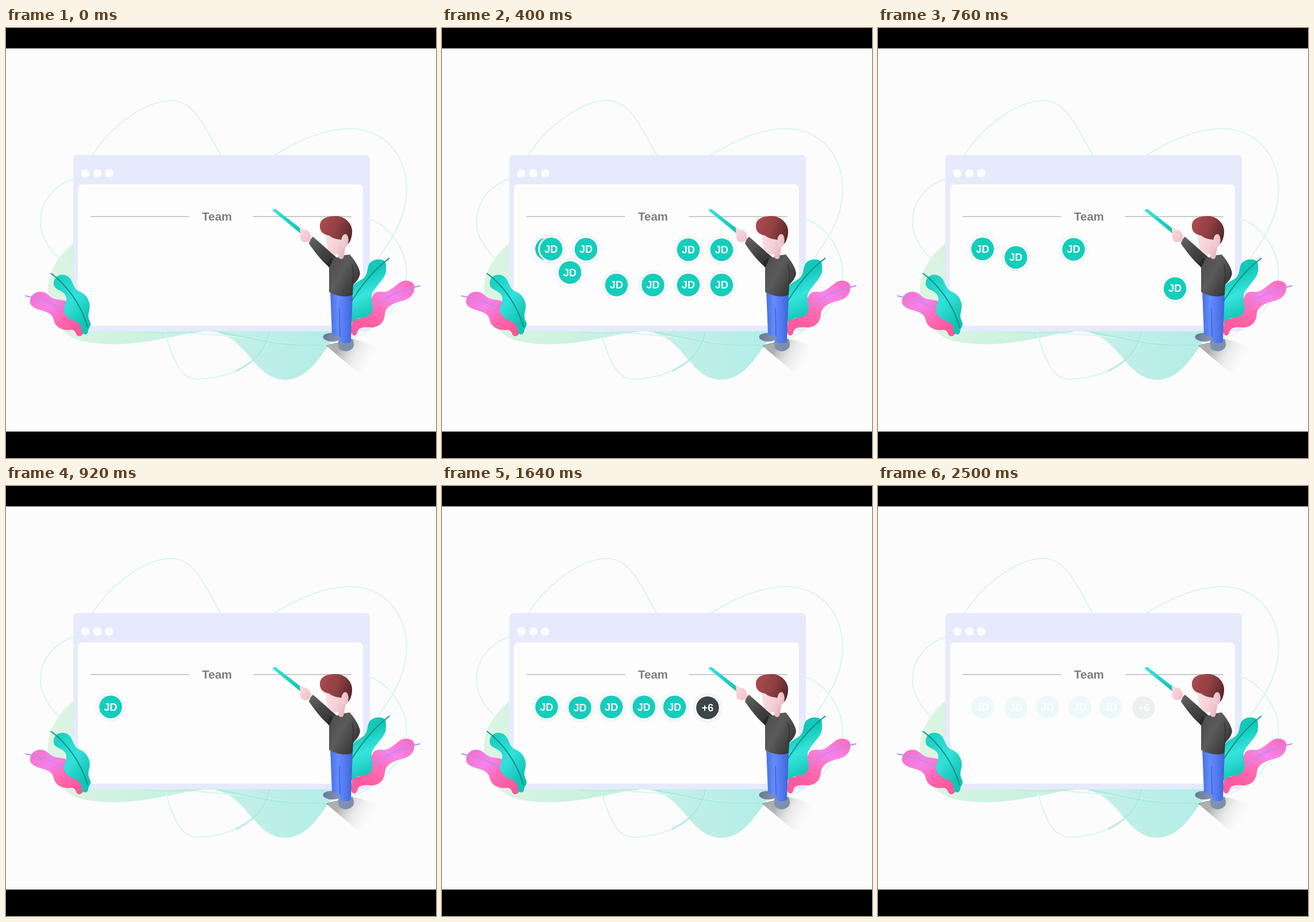
An HTML page with a canvas for the animation above (2740 ms loop, 748 by 748 pixels).

```html
<!DOCTYPE html>
<html lang="en">
<head>
<meta charset="utf-8">
<title>Team</title>
<style>
  html, body { margin: 0; width: 100%; height: 100%; overflow: hidden; background: #fcfcfc; }
  canvas { position: absolute; left: 0; top: 0; width: 748px; height: 748px; }
</style>
</head>
<body>
<canvas id="scene"></canvas>
<canvas id="avatars"></canvas>
<script>
const SIZE = 748, LOOP = 2740, TICK = 20;
const FONT = '"Liberation Sans", Arial, sans-serif';

function layer(id) {
  const canvas = document.getElementById(id);
  const dpr = window.devicePixelRatio || 1;
  canvas.width = canvas.height = Math.round(SIZE * dpr);
  const ctx = canvas.getContext('2d');
  ctx.scale(dpr, dpr);
  return ctx;
}
const bg = layer('scene'), fg = layer('avatars');

// ---- Static illustration ----
function grad(x0, y0, x1, y1, ...colors) {
  const g = bg.createLinearGradient(x0, y0, x1, y1);
  colors.forEach((c, i) => g.addColorStop(i / (colors.length - 1), c));
  return g;
}
function fill(d, style) {
  bg.fillStyle = style;
  bg.fill(new Path2D(d));
}
function line(d, style, width) {
  bg.strokeStyle = style;
  bg.lineWidth = width;
  bg.stroke(new Path2D(d));
}
function box(x, y, w, h, r, style) {
  bg.fillStyle = style;
  bg.beginPath();
  bg.roundRect(x, y, w, h, r);
  bg.fill();
}
function oval(x, y, rx, ry, turn, style) {
  bg.fillStyle = style;
  bg.beginPath();
  bg.ellipse(x, y, rx, ry, turn, 0, Math.PI * 2);
  bg.fill();
}

function drawBackdrop() {
  box(0, 0, SIZE, SIZE, 0, '#fcfcfc');
  fill('M125 368C98 388 73 418 73 455C74 500 95 534 130 544C205 562 285 536 338 528C420 520 424 612 487 612C530 610 548 566 580 527L580 400Z',
    grad(80, 0, 560, 0, '#dcf4e2', '#cbf2df', '#c2f0e7', '#b3ede8'));
  const mint = '#d6f7ef';
  line('M150 222C183 168 245 126 288 126C330 126 350 182 374 222', mint, 2);
  line('M466 222C520 188 565 174 603 175C660 178 697 222 697 282C696 335 668 372 633 420', mint, 2);
  line('M632 332C668 345 696 385 697 425C695 480 640 545 545 553C480 555 420 530 240 528', mint, 2);
  line('M118 262C85 273 60 300 60 338C60 370 90 405 118 419', mint, 2);
  line('M275 527C290 570 300 612 335 611C400 608 452 575 460 527', mint, 2);
  line('M370 529C430 540 480 555 555 552M400 597C435 580 454 556 459 527', '#a5e8dd', 2);
  line('M240 528C265 532 310 530 340 528', '#b5ecdc', 2);
}

function drawWindow() {
  box(117, 221, 516, 306.5, 8, '#e6eafc');
  box(125, 272, 496, 246, 8, '#fdfdfd');
  for (const x of [138, 159, 179.5]) oval(x, 253, 7.3, 7.3, 0, '#fdfdfd');
  line('M147 328H318.5M429.5 328H601', '#bababa', 1.4);
  bg.fillStyle = '#7d7d7d';
  bg.font = `bold 20.5px ${FONT}`;
  bg.textAlign = 'center';
  bg.fillText('Team', 367, 334.5);
}

function drawLeaves() {
  bg.lineCap = 'round';
  fill('M42 473C45 458 62 455 72 463C84 475 92 471 104 475C115 490 125 505 131 515C138 525 136 537 126 536C120 534 124 528 115 525C100 527 86 522 83 508C80 493 66 494 52 488C44 484 41 480 42 473Z',
    grad(55, 460, 120, 530, '#f873cd', '#f581ea', '#ff67b0', '#fb5799'));
  line('M34 466C62 471 84 479 104 491', '#b98af2', 1.8);
  fill('M83 445C82 432 95 426 106 431C118 438 115 452 127 458C143 464 149 480 144 495C141 508 149 510 147 518C145 522 143 523 143 528C141 536 133 534 131 526C132 515 124 512 115 508C100 500 98 490 104 478C108 464 100 460 92 456C86 453 83 450 83 445Z',
    grad(85, 450, 145, 500, '#1ed0c4', '#33e1da', '#13c3b4'));
  line('M78.500 427C106 447 131 482 142 520', '#079585', 2);

  fill('M710 455C714 440 697 437 688 441C676 448 668 460 655 459C640 458 636 462 634 485C632 500 612 510 603 505L600 528C602 537 609 537 611 530C613 520 622 520 635 521C652 520 658 510 659 498C661 483 675 478 692 474C704 470 709 463 710 455Z',
    grad(690, 440, 635, 520, '#fb70c4', '#f684ec', '#ff6eb5', '#fc5c9f'));
  line('M720 448.500C690 455 660 466 637 488', '#b98af2', 1.8);
  fill('M661 414C662 402 650 401 640 404C630 408 630 415 628 425C624 440 612 437 600 452L600 514C609 501 625 507 634 498C642 488 633 470 637 462C642 450 655 440 660 428Q662 420 661 414Z',
    grad(620, 430, 645, 490, '#14c7b9', '#37e4dd', '#19cabd'));
  line('M666.500 400.500C642 419 620 445 602 474', '#079585', 2);
}

function drawPresenter() {
  fill('M556 552L612 599Q640 588 653 561Q630 545 603 541Z',
    grad(582, 552, 636, 580, 'rgba(70,70,70,.42)', 'rgba(150,150,150,.16)', 'rgba(200,200,200,0)'));

  const shoe = grad(552, 530, 606, 562, '#6b7790', '#8195b2', '#788ca8');
  oval(567, 538, 15.5, 7.5, .05, shoe);
  fill('M579 541L603 541Q607 552 603 557Q594 566 582 560Q575 554 579 541Z', shoe);

  const blue = grad(564, 0, 604, 0, '#466fe0', '#638bfb', '#527af0', '#3b62cd');
  fill('M564 456L603 463L600 546Q591 551 581 546L580 535Q573 538 567 531Z', blue);
  line('M580 488L581 536', '#3e65d2', 1.5);

  fill('M463 317L468.500 314.500L518 353L513 358Z', grad(465, 316, 514, 356, '#36e5e0', '#12bfb1'));
  fill('M511 349Q513 345 517 350Q527 351 529 358Q533 363 528 370Q521 375 514 370Q511 367 512 359Z',
    grad(512, 355, 530, 370, '#f9d8dc', '#efbfc8'));

  const cloth = grad(562, 400, 617, 430, '#4c4c4c', '#5b5b5b', '#393939');
  fill('M527 375Q529 367 534 363L568 393L578 402L564 417Q549 407 527 375Z',
    grad(530, 366, 568, 412, '#636363', '#454545', '#303030'));
  fill('M565 398Q574 402 583 396L598 394C605 402 615 416 616 427C614 438 607 443 604 447L603 464C594 470 573 466 562 459L562 419Z', cloth);
  fill('M562 417Q567 409 569 401L566 399L558 411Z', '#292929');
  line('M602 412Q607 430 602 446', '#333333', 1.5);

  const skin = grad(556, 370, 598, 385, '#fadde0', '#f4cfd5', '#e4adb9');
  fill('M556 354L590 354L590 384L587 400Q583 404 579 400L577 393C563 397 556 383 556 354Z', skin);
  fill('M546 345C546 330 560 327 575 327C592 328 604 343 602 357C601 368 597 375 594 376L582 368Q569 367 562 361C550 359 546 352 546 345Z',
    grad(550, 337, 602, 356, '#aa494d', '#914044', '#59282a'));
  oval(589.500, 370, 6.3, 11.5, .08, grad(584, 0, 597, 0, '#f5d2d7', '#e8b5bf'));
}

drawBackdrop();
drawWindow();
drawLeaves();
drawPresenter();
box(0, 0, SIZE, 35.5, 0, '#000');
box(0, 702, SIZE, 46, 0, '#000');

// ---- Avatars ----
const HOME = { x: 182, y: 384.3 };
const TEAL = '#15cdbc';

// x, y, start, duration and pull-back strength of each flight home
const team = [
  [182, 448, 165, 230, 2.05],
  [245, 385.7, 160, 230, 2.05],
  [303.5, 385.7, 173, 230, 2.05],
  [367, 385.7, 189, 230, 2.05],
  [244, 447, 208, 230, 2.05],
  [428.5, 385.7, 405, 310, 3],
  [303.5, 447, 420, 310, 3],
  [367, 447, 435, 310, 3],
  [428.5, 447, 461, 312, 3],
  [486.5, 385.7, 485, 306, 3],
  [486.5, 447, 467, 419, 3]
];
const row = [[240, 385.7], [294.7, 384.3], [351.3, 384.3], [404.7, 384.3], [462, 385.7]];

const clamp = v => Math.min(1, Math.max(0, v));
const mix = (a, b, k) => a + (b - a) * k;
const backIn = (u, s) => u * u * ((s + 1) * u - s);
const easeOut = u => 1 - (1 - u) ** 3;

function disc(x, y, r, color) {
  fg.fillStyle = color;
  fg.beginPath();
  fg.arc(x, y, r, 0, Math.PI * 2);
  fg.fill();
}
function avatar(x, y, label = 'JD', color = TEAL) {
  fg.save();
  fg.shadowColor = 'rgba(60,60,130,.13)';
  fg.shadowBlur = 6;
  disc(x, y, 22.5, '#fff');
  fg.restore();
  disc(x, y, 19.8, color);
  fg.fillStyle = '#fff';
  fg.fillText(label, x, y + 6.2);
}

function drawGather(t) {
  for (const [x, y, start, span, pull] of team) {
    const u = clamp((t - start) / span);
    if (u === 1) continue;
    const k = backIn(u, pull);
    avatar(mix(x, HOME.x, k), mix(y, HOME.y, k));
  }
}
function drawSpread(t) {
  const dip = 5 * Math.sin(Math.PI * clamp((t - 1368) / 60));
  const k = easeOut(clamp((t - 1392) / 248));
  for (let i = row.length - 1; i >= 0; i--) {
    const [x, y] = row[i], last = i === row.length - 1;
    avatar(mix(HOME.x, x, k) - dip, mix(HOME.y, y, k), last ? '+6' : 'JD', last ? '#3a4647' : TEAL);
  }
}
function opacity(t) {
  if (t < 140) return t / 140;
  if (t < 2380) return 1;
  return 1 - .93 * clamp((t - 2360) / 140);
}

function render(now) {
  const t = Math.floor((now % LOOP) / TICK) * TICK;
  fg.clearRect(0, 0, SIZE, SIZE);
  fg.font = `bold 18px ${FONT}`;
  fg.textAlign = 'center';
  avatar(HOME.x, HOME.y);
  if (t < 1380) drawGather(t);
  else drawSpread(t);
  fg.canvas.style.opacity = opacity(t);
}

let origin;
function loop(now) {
  origin ??= now;
  render(now - origin);
  requestAnimationFrame(loop);
}
render(0);
requestAnimationFrame(loop);
</script>
</body>
</html>
```
